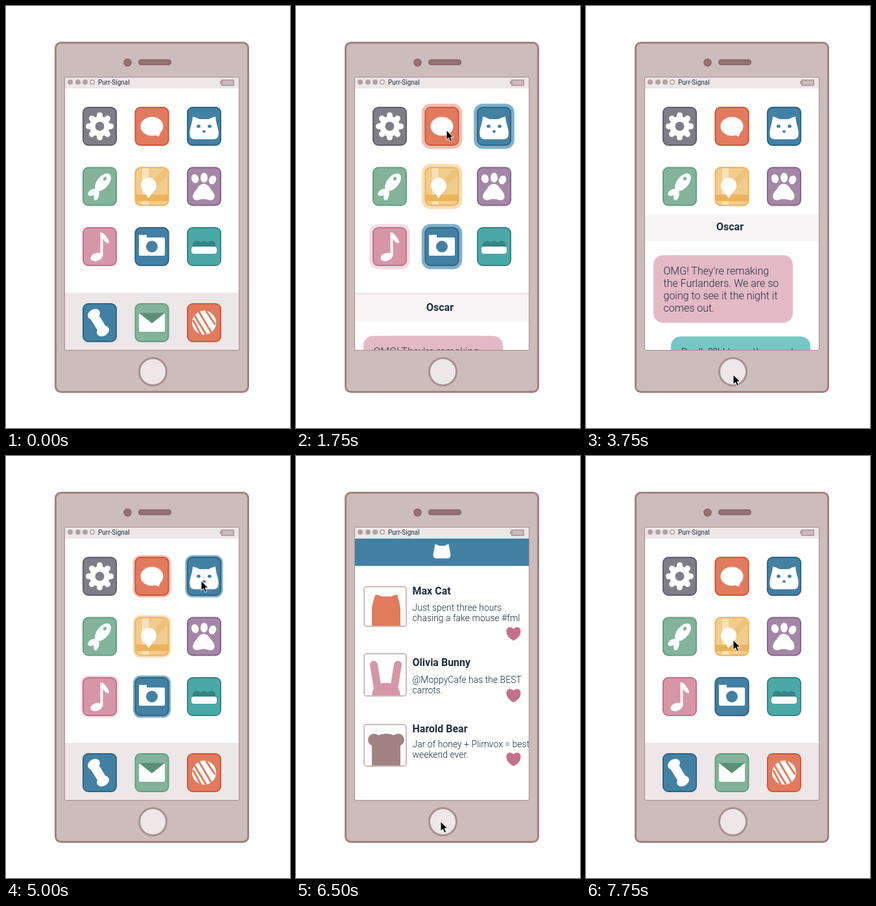
An HTML page for the animation above (8 s loop, 438 px wide and 649 px high).

```html
<!DOCTYPE html>
<html lang="en">
<head>
<meta charset="utf-8">
<style>
  html, body { margin: 0; width: 100%; height: 100%; overflow: hidden; background: #fff; }
  svg { display: block; width: 438px; height: 649px; }
  text { font-family: Roboto, sans-serif; fill: #1f2d3d; }
  .name { font-size: 16px; font-weight: 700; }
  .post { font-size: 14px; font-weight: 300; }
  .chat { font-size: 16px; font-weight: 300; }
</style>
</head>
<body>
<svg id="stage" viewBox="0 0 438 649"></svg>
<script>
const PERIOD = 8000, STEP = 250, TRAVEL = 402;

const ellipse = (x, y, rx, ry, turn = 0, fill = '#fff') =>
  `<ellipse rx="${rx}" ry="${ry}" fill="${fill}" transform="translate(${x} ${y}) rotate(${turn})"/>`;
const rect = (x, y, w, h, r, fill, stroke = 'none', width = 2) =>
  `<rect x="${x}" y="${y}" width="${w}" height="${h}" rx="${r}" fill="${fill}" stroke="${stroke}" stroke-width="${width}"/>`;
const path = (d, fill = '#fff') => `<path d="${d}" fill="${fill}"/>`;
const line = (d, color, width, cap = 'butt') =>
  `<path d="${d}" fill="none" stroke="${color}" stroke-width="${width}" stroke-linecap="${cap}"/>`;
const lines = (x, y, gap, kind, rows) =>
  rows.map((row, i) => `<text class="${kind}" x="${x}" y="${y + i * gap}">${row}</text>`).join('');

// fill, border, halo
const gray = ['#7f7d87', '#615f69'];
const red = ['#e27b5e', '#d2573a', '#f2bfb2'];
const blue = ['#4281a4', '#2f6484', '#7fafca'];
const green = ['#83b39b', '#629f80'];
const yellow = ['#f2cc8c', '#ecb35d', '#f6dfb6'];
const purple = ['#a487a6', '#856589'];
const pink = ['#d696a8', '#c4708b', '#f2dde4'];
const teal = ['#4aa9a6', '#358485'];

const catHead = path('M-17.5-15Q-12-14-7-11H7Q12-14 17.5-15Q18-8 21 2Q24 14 20 18Q18 20 12 20H-12Q-18 20-20 18Q-24 14-21 2Q-18-8-17.5-15Z');

const art = {
  gear: [0, 45, 90, 135].map(a =>
      `<g transform="rotate(${a})">${line('M0-17V17', '#fff', 9, 'round')}</g>`).join('') +
    ellipse(0, 0, 15.5, 15.5) + ellipse(0, 0, 7, 7, 0, gray[0]),
  bubble: ellipse(0, 0, 17.5, 14.5) + path('M2 13Q8 14 10 16Q12 14 14 6Z'),
  cat: catHead + ellipse(-8.5, 0, 3, 2.5, 15, blue[0]) + ellipse(8.5, 0, 3, 2.5, -15, blue[0]) +
    ellipse(0, 8, 2.5, 2, 0, blue[0]),
  fish: ellipse(5, -6.5, 16, 9, -50) + ellipse(-11, 9, 8, 4.5, -30) + ellipse(-5, 13.5, 8, 4, -75) +
    ellipse(8, -12, 2.5, 3, 30, green[0]),
  map: line('M24-26L-2 2', '#efc27a', 10) + rect(-15, -28, 10, 56, 0, '#f8e2bb') +
    rect(-25, 12.5, 50, 10, 0, yellow[1]) + ellipse(-5, -1.5, 12, 12) + path('M-15 4L-5 18L5 4Z'),
  paw: ellipse(-14, -12, 5.5, 7, -20) + ellipse(0, -13.5, 5.5, 7.5) + ellipse(13, -10, 5.5, 7, 25) +
    path('M-1-4Q6-4 10 4Q17 11 16 17Q14 22 8 21Q4 19-1 19.5Q-6 19-9 21Q-16 22-17.5 16Q-17 10-11 4Q-7-4-1-4Z'),
  note: path('M1-22V15H5V-12Q8-6 14-5Q15-7 13-11Q9-18 5-21Z') + ellipse(-5, 16, 9.5, 6, -18),
  camera: rect(-20, -14, 40, 28, 2, '#fff') + rect(-20, -18, 12, 8, 0, '#fff') + ellipse(0, 0, 9, 9, 0, blue[0]),
  bed: [-11, 0, 11].map(x => ellipse(x, -2, 6.8, 6.8, 0, teal[1])).join('') + rect(-19.5, 0, 39, 11, 4, '#fff'),
  phone: line('M-8-9L5 12', '#fff', 14) + ellipse(-9, -13, 10, 7.5, -30) + ellipse(5, 13, 10, 7.5, -30),
  mail: rect(-20, -15, 40, 29, 2, '#fff') + path('M-20-15H20L0 1Z', '#5b8f77'),
  yarn: ellipse(0, 0, 18.5, 18.5) + line('M-17-4L-5 18M-16-13L3 18M-8-17L11 15M3-18L17 3', red[0], 3),
};

const icons = [
  ['gear', gray], ['bubble', red, 1], ['cat', blue, 1],
  ['fish', green], ['map', yellow, 1], ['paw', purple],
  ['note', pink, 1], ['camera', blue, 1], ['bed', teal],
  ['phone', blue], ['mail', green], ['yarn', red],
];
const rowY = [185, 277.5, 370, 487];

function icon([kind, [fill, border, halo], pulses], i) {
  const x = 144.5 + 80.5 * (i % 3), y = rowY[Math.floor(i / 3)];
  return `<g transform="translate(${x} ${y})">` +
    (pulses ? `<rect class="halo" fill="${halo}"/>` : '') +
    rect(-25.5, -29, 51, 58, 8, fill, border) + art[kind] + '</g>';
}

const bubbleBox = (x, y, fill, rows) =>
  rect(x, y, 215, 104, 15, fill) + lines(x + 15.5, y + 30, 19, 'chat', rows);

const messages =
  rect(91, 127, 268, 440, 0, '#fff') + rect(91, 127, 268, 42, 0, '#f7f5f5') +
  '<text class="name" x="222" y="152" text-anchor="middle">Oscar</text>' +
  bubbleBox(104, 190, '#e4b9c6', ["OMG! They're remaking", 'the Furlanders. We are so', 'going to see it the night it', 'comes out.']) +
  bubbleBox(131, 315, '#78c5c3', ['Really??! I hope they cast', 'someone good. I loved it', 'so much when I was just', 'a kitten.']);

const heart = y => `<g transform="translate(335.5 ${y})">` +
  path('M0-7C-4-12-12-10-11-2Q-10 6 0 11Q10 6 11-2C12-10 4-12 0-7Z', pink[1]) + '</g>';
const post = (top, height, picture, nameY, name, textY, rows, heartY) =>
  picture + rect(105, top + 1, 65, height - 2, 4, 'none', '#ccbcbc') +
  lines(179.5, nameY, 0, 'name', [name]) + lines(179.5, textY, 16, 'post', rows) + heart(heartY);

const feed =
  rect(91, 127, 268, 440, 0, '#fff') + rect(91, 127, 268, 42, 0, blue[0]) +
  `<g transform="translate(225 145) scale(.6 .63)">${catHead}</g>` +
  post(200, 63, path('M117 262V235Q118 224 123 213Q128 214 132 216H147Q151 214 156 213Q160 224 161 235V262Z', '#e07b5c'),
    213, 'Max Cat', 238, ['Just spent three hours', 'chasing a fake mouse #fml'], 273) +
  post(303, 67, line('M120 321L126 358M157 321L151 358', pink[0], 12, 'round') + path('M117 369Q118 349 139 349Q160 349 161 369Z', pink[0]),
    323, 'Olivia Bunny', 349, ['@MoppyCafe has the BEST', 'carrots.'], 368) +
  post(412, 66, ellipse(120.5, 436.5, 9.5, 9.5, 0, '#a38282') + ellipse(157.5, 436.5, 9.5, 9.5, 0, '#a38282') +
      path('M117 477V438Q124 427 139 427Q154 427 161 438V477Z', '#a38282'),
    425, 'Harold Bear', 448, ['Jar of honey + Plimvox = best', 'weekend ever.'], 466);

const statusBar =
  rect(91, 110, 268, 17, 0, '#ede7e7') +
  [99, 111, 122].map(x => ellipse(x, 117, 4, 4, 0, '#b3a0a0')).join('') +
  '<circle cx="133" cy="117" r="3.2" fill="#fff" stroke="#b3a0a0" stroke-width="1.6"/>' +
  '<text x="142" y="121" font-size="10">Purr-Signal</text>' +
  rect(330, 115, 3, 5, 0, '#b3a0a0') + rect(333, 114, 18, 8, 0, '#ccbcbc', '#b3a0a0');

document.getElementById('stage').innerHTML =
  '<clipPath id="screen"><rect x="91" y="110" width="268" height="419"/></clipPath>' +
  rect(76.5, 56.5, 297, 537, 8, '#ccbcbc', '#a38282', 3) +
  '<circle cx="187.5" cy="87" r="5.5" fill="#967272" stroke="#8a6464" stroke-width="1.5"/>' +
  rect(204.8, 82.8, 49.5, 7.5, 3.5, '#967272', '#8a6464', 1.5) +
  '<circle cx="226.5" cy="562.5" r="21" fill="#ede7e7" stroke="#a89090" stroke-width="3"/>' +
  '<g clip-path="url(#screen)">' +
    rect(91, 110, 268, 419, 0, '#fff') + statusBar + rect(91, 441, 268, 88, 0, '#ede7e7') +
    icons.map(icon).join('') +
    `<g id="messages">${messages}</g><g id="feed">${feed}</g>` +
  '</g>' +
  rect(90.5, 109.5, 269, 420, 2, 'none', '#a98c8c', 1) +
  '<path id="cursor" d="M0 0V15L3.5 11.8 6 17.5 8.7 16.3 6.3 10.8H11Z" stroke="#fff"/>';

const byId = id => document.getElementById(id);
const halos = document.querySelectorAll('.halo');
const clamp = x => Math.min(1, Math.max(0, x));
const cubicOut = x => 1 - (1 - x) ** 3;
const backIn = x => x * x * (2.70158 * x - 1.70158);
const smooth = x => x * x * (3 - 2 * x);

const panelY = (t, open, close) =>
  TRAVEL * (1 - cubicOut(clamp((t - open) / 250)) + backIn(clamp((t - close) / 300)));

// start, end, from, bend, to
const moves = [
  [1500, 1700, [232, 191], [232, 191], [232, 191]],
  [2500, 3300, [232, 191], [240, 380], [227, 567]],
  [3850, 4900, [227, 567], [446, 380], [301, 192]],
  [5600, 6400, [301, 192], [270, 400], [223, 562]],
  [7050, 7600, [223, 562], [235, 420], [227, 283]],
];

function cursorAt(t) {
  const [start, end, from, bend, to] = moves.filter(m => t >= m[0]).pop() || moves[0];
  const u = smooth(clamp((t - start) / (end - start)));
  return from.map((a, i) => a * (1 - u) ** 2 + 2 * bend[i] * u * (1 - u) + to[i] * u * u);
}

function draw(t) {
  const grow = 2.5 * (1 - Math.cos(2 * Math.PI * t / 4000));
  for (const halo of halos) {
    const box = { x: -26.5 - grow, y: -30 - grow, width: 53 + 2 * grow, height: 60 + 2 * grow, rx: 9 + grow };
    for (const key in box) halo.setAttribute(key, box[key]);
  }
  byId('messages').setAttribute('transform', `translate(0 ${panelY(t, 1731, 3490)})`);
  byId('feed').setAttribute('transform', `translate(0 ${panelY(t, 5000, 6702)})`);
  byId('cursor').setAttribute('transform', `translate(${cursorAt(t)})`);
  byId('cursor').setAttribute('visibility', t < 1500 ? 'hidden' : 'visible');
}

function tick() {
  draw(Math.floor(performance.now() % PERIOD / STEP) * STEP);
  requestAnimationFrame(tick);
}
tick();
</script>
</body>
</html>
```
